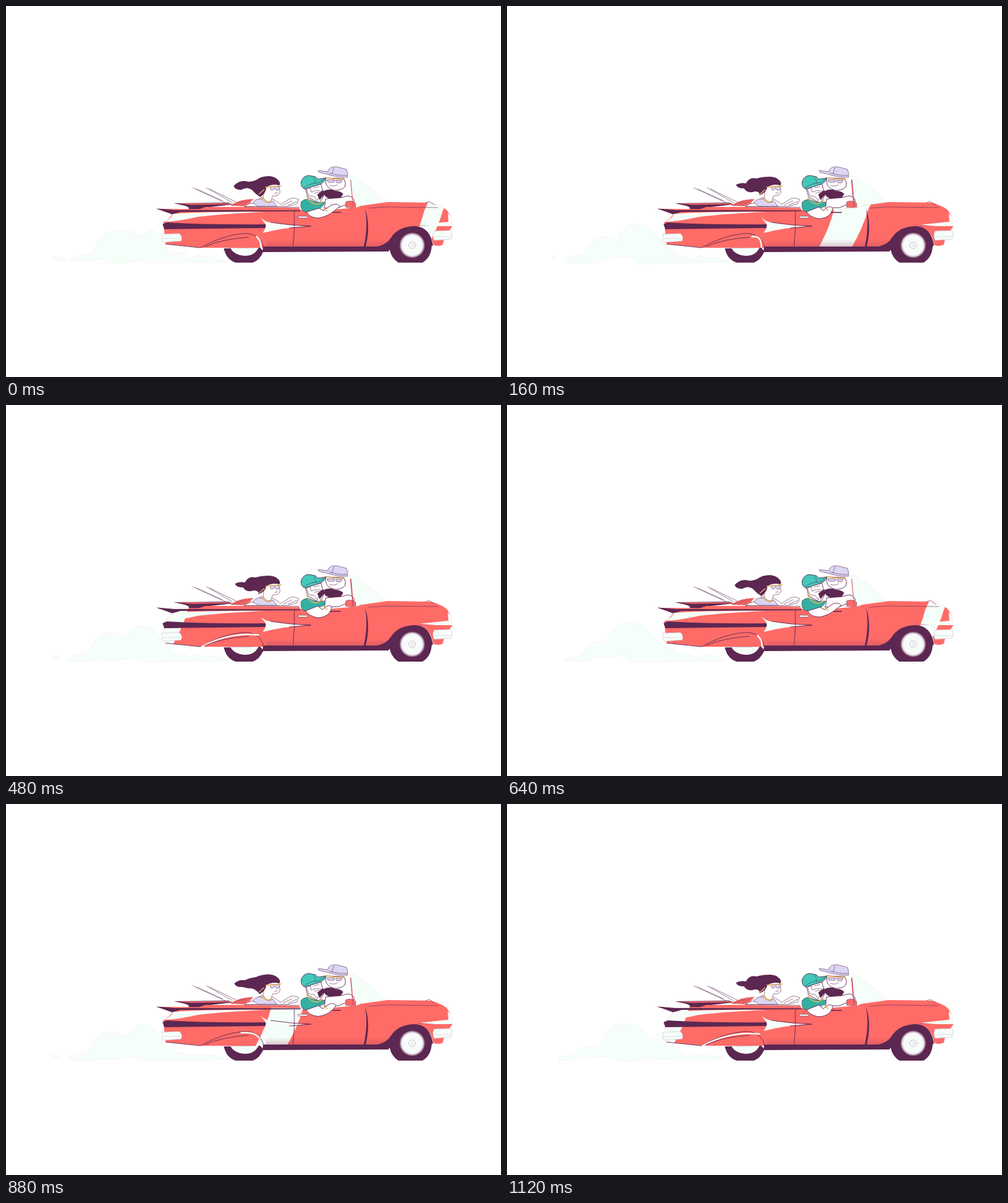
Write an HTML page that moves like this. It is 800 px wide and 600 px high and loops after 1.2 s.

```html
<!DOCTYPE html>
<html lang="en">
<head>
<meta charset="utf-8">
<title>Convertible</title>
<style>
html, body { margin: 0; width: 100%; height: 100%; overflow: hidden; background: #fff }
svg { display: block; width: 800px; height: 600px }
.red { fill: #ff6b67 }
.dark { fill: #5c2751 }
.mint { fill: #f6fef9 }
.teal { fill: #43c9b9 }
.shade { fill: #33b0a3 }
.lilac { fill: #dcd6f4 }
.skin { fill: #fffdfd }
.ink { stroke: #5c2751; stroke-width: .9; stroke-linejoin: round; stroke-linecap: round }
.thin { stroke-width: .6 }
.line { fill: none }
.gold { fill: none; stroke: #e5b254; stroke-width: 1.6; stroke-linecap: round }
</style>
</head>
<body>
<svg viewBox="0 0 800 600">
<defs>
  <path id="body" d="M243 328 L475 330 H520 L566 326 L574 323 L617 317 L686 318 Q711 325 715 334 Q722 345 721 357 L716 364 H691 L708 377 L706 386 Q698 390 690 386 Q688 360 660 357 Q634 357 627 380 L612 391 H350 L318 391 L258 385 L254 350 L262 345 L269 337 Z"/>
  <clipPath id="shell"><use href="#body"/></clipPath>
  <radialGradient id="hub">
    <stop offset=".74" stop-color="#f7fcfa"/>
    <stop offset=".84" stop-color="#e6d6e1"/>
    <stop offset="1" stop-color="#5c2751"/>
  </radialGradient>
  <linearGradient id="low" x2="0" y2="1">
    <stop offset=".5" stop-color="#8f3a5a" stop-opacity="0"/>
    <stop offset="1" stop-color="#8f3a5a" stop-opacity=".3"/>
  </linearGradient>
</defs>

<path id="smoke" class="mint" stroke="#f3ede9" stroke-width=".6"/>

<!-- rear deck -->
<path class="ink line thin" d="M302 294 L356 319 M308 296 L350 315 M324 294 L366 318 M329 296 L372 317"/>
<path class="dark" d="M271 319 L360 318 L366 321 L330 325 L318 329 H294 Q299 326 289 323 Z"/>
<path class="red" d="M276 319.5 L360 319 L364 320.500 L300 321.500 Z M322 325 L385 325 L474 326.500 L476 330 H308 Z M362 323 Q375 313 400 312 L390 324 Z"/>
<path class="ink line thin" d="M366 323 L382 315 M373 323 L388 314 M380 323 L395 313 M385 324.500 L474 325.500"/>

<!-- woman -->
<path class="skin ink thin" d="M386 324 Q392 318 403 319 L410 311 Q425 308 434 314 L444 321 L458 312 Q465 309 473 313 L470 320 L455 324 Z"/>
<path class="lilac ink thin" d="M399 318 Q406 309 415 313 Q424 322 431 315 L438 324 H408 Z"/>
<path class="skin ink thin" d="M418 288 H440 L443 301 Q441 308 431 307 L428 316 Q421 319 416 310 Z"/>
<path id="hair" class="dark"/>
<path class="lilac ink thin" d="M427 292 H442 Q442 299 437 298 L434 294 Q431 300 428 297 Z"/>
<path class="gold" d="M409 304 L417 297 M420 293 L445 291 M413 309 Q419 320 427 316"/>
<path class="ink line thin" d="M434 303 L439 302 M448 322 L462 315 M456 322 L470 316"/>

<!-- driver -->
<path class="skin ink" d="M517 278 L546 279 Q550 285 548 292 Q542 299 530 298 Q519 295 517 287 Z"/>
<path class="dark" d="M512 300 Q522 294 532 299 Q541 299 545 304 L541 310 L524 312 Q514 309 512 300 Z"/>
<path class="skin ink" d="M517 312 L541 310 L552 307 Q562 308 563 316 L554 319 L538 326 L515 327 Z"/>
<path class="lilac ink thin" d="M505 266 L520 268 Q522 259 534 260 L550 264 Q553 269 552 277 Q532 277 519 272 L506 269 Z"/>
<path class="ink line thin" d="M527 271 L530 262 M522 270 Q538 275 551 274"/>
<path class="lilac ink thin" d="M519 281 H531 L530 285 H521 Z M533 282 H543 L541 286 H535 Z"/>
<path class="gold" d="M517 278 L547 281"/>
<path class="ink line thin" d="M523 290 Q530 293 536 289"/>

<!-- windscreen and wheel -->
<path class="mint" stroke="#ece9eb" stroke-width=".6" d="M556 275 L564 277 Q592 294 619 322 L590 326 H566 Z"/>
<path class="red ink thin" d="M549 325 V317 Q557 313 565 319 V327 Z"/>
<path id="pillar" class="line" stroke="#c74b5b" d="M557 281 L561 325"/>

<!-- coachwork -->
<use href="#body" class="red"/>
<path id="shine" class="mint" clip-path="url(#shell)"/>
<path class="dark" d="M243 327.500 L272 330 L476 330.500 V332 L282 333 L269 337 Z"/>
<path class="dark" d="M487 333 H541 V334.500 H487 Z"/>
<path class="mint" d="M270 336 Q340 332 420 333 Q350 336 310 341 Q280 348 256 349 Q267 344 270 336 Z"/>
<path class="dark" d="M253 353 L260 350 Q330 354 421 353 V359 Q330 360 256 361 Z"/>
<path fill="url(#low)" d="M420 365 H612 L622 390 H420 Z"/>
<path class="mint" d="M411 342 Q418 349 428 350 Q455 355 490 356 Q450 358 415 367 Q422 357 419 352 Z"/>
<path class="ink line" d="M428 350 Q460 355 493 356 L458 359"/>
<path class="ink line" stroke-width="1.5" d="M466 332 Q467 360 464 388"/>
<path class="dark" d="M580 327 Q590 355 581 390 H578 Q586 355 580 327 Z"/>
<path class="mint ink thin" d="M472 340 H486 Q490 342 486 343 H473 Z"/>
<path class="ink line thin" d="M586 327 L614 325 L698 326 M668 355 L715 354"/>
<path class="mint" d="M668 354 Q695 351 715 349 L714 335 Q722 342 721 356 L695 356 Z"/>
<path class="ink line thin" d="M678 318 L684 316 L693 322"/>
<path class="dark" d="M416 389 H600 Q615 386 622 375 Q634 356 662 356 Q686 358 690 388 L622 391 L618 397 L414 398 Z"/>
<path class="ink line" stroke-width="2" d="M258 385 L314 391 Q350 371 382 368 Q408 366 416 388 V396"/>
<path id="fender" class="line" stroke="#f6fef9" stroke-width="2.400" stroke-linecap="round"/>
<path class="ink line" d="M322 389 Q348 377 392 374"/>
<path class="mint" stroke="#cdc6d1" stroke-width=".7" d="M251 369 L280 368 Q286 373 283 380 L256 382 Q249 380 253 376 Z M692 364 L719 363 Q723 370 719 377 L692 379 Q688 371 692 364 Z"/>
<path class="line" stroke="#d9d2dc" stroke-width=".8" d="M253 376 H282 M692 373 H720"/>

<!-- wheels -->
<path class="dark" d="M352 392 L411 391 L416 397 Q410 411 399 415 H371 Q356 410 352 392 Z"/>
<path class="mint" d="M363 392 L408 391 Q402 404 386 404 Q369 403 363 392 Z"/>
<path class="dark" d="M620 394 Q621 360 656 357 Q688 360 688 388 Q687 407 673 415 H634 Q623 408 620 394 Z"/>
<circle cx="656.500" cy="387" r="21" fill="url(#hub)"/>
<circle cx="656.500" cy="387" r="5.500" fill="#f8faf8" stroke="#c9c3cc"/>
<path class="line" stroke="#d5ced8" d="M655 384 L659 387 L655 390"/>

<!-- front passenger -->
<path class="skin ink" d="M484 294 L509 288 L511 296 L515 302 Q512 312 506 319 L488 309 Z"/>
<path id="shirt" class="shade ink thin"/>
<path id="arm" class="skin ink"/>
<path class="skin ink thin" d="M486 296 L492 294 L493 301 Q500 297 509 299 L511 304 L506 307 L503 315 L498 308 L490 307 Z"/>
<path class="dark" d="M503 305 L512 298 L516 304 Q511 308 507 314 Z"/>
<path class="ink line thin" d="M497 294 L506 292 M498 303 Q504 300 509 302"/>
<path class="teal ink" d="M477 285 Q479 275 489 274 L500 276 L504 280 L517 278 Q515 286 505 289 L483 296 Q476 293 477 285 Z"/>
<path class="ink line thin" d="M482 294 Q492 286 505 286 L515 280 M497 277 Q501 281 500 287"/>
<path id="chain" class="gold"/>
</svg>
<script>
const STEP = 80, FRAMES = 15;
const $ = id => document.getElementById(id);
const draw = (id, d) => $(id).setAttribute('d', d);

const smoke = [
  'M103 413Q112 402 133 401Q142 399 147 386Q150 364 180 363Q205 361 215 371Q225 369 234 362Q245 364 252 382Q266 400 272 401Q283 393 292 404Q297 411 302 408Q312 401 320 407Q330 402 338 408L358 414L235 415Q220 413 210 412Q180 421 160 412Q150 406 140 412ZM73 408Q80 403 83 408Q95 402 98 411Q90 416 88 411Q76 414 73 408Z',
  'M100 414Q104 404 125 402Q136 400 140 388Q147 368 170 369Q188 369 196 377Q203 358 220 357Q238 357 246 375Q262 394 276 403Q286 400 296 408Q312 401 321 407Q334 403 358 413L224 416Q208 407 195 410Q172 415 155 411Q148 414 132 415ZM73 407Q78 403 81 407Q86 405 88 409Q80 412 73 407Z',
  'M95 414Q100 404 118 403Q128 398 131 389Q140 371 158 374Q172 374 180 379Q186 354 207 353Q230 353 241 371Q250 382 256 385Q275 398 280 405Q290 410 300 409Q312 400 322 407Q340 405 358 414L212 417Q200 402 185 406Q165 409 150 411Q145 417 125 416ZM73 405Q76 402 79 405Q77 410 73 405Z',
  'M92 413Q96 405 112 408Q122 407 126 397Q134 381 152 383Q162 384 164 376Q175 353 197 352Q222 353 232 369Q248 390 262 393Q272 394 280 402Q300 404 310 410Q325 402 340 406L354 414L200 416Q190 400 183 404Q172 411 160 409Q140 405 130 415Z',
  'M82 413Q84 405 97 408Q110 408 116 397Q130 390 145 391Q154 390 157 376Q165 356 187 355Q212 356 221 367Q230 383 235 380Q242 368 250 376Q256 390 272 394Q283 400 290 410Q305 403 315 408Q330 405 350 411L330 414L240 413Q225 408 215 414Q190 420 175 412Q165 408 150 409Q130 411 112 412Q95 418 82 413Z'
];

// left and right edge of the reflection at the belt line, for each step
const shine = [[676, 706], [608, 653], [528, 583], [428, 480], [321, 368], [280, 324], [250, 294], [205, 238]];

// blends the numbers of two paths of the same form
function blend(a, b, k) {
  const ends = b.match(/[\d.]+/g);
  let i = 0;
  return a.replace(/[\d.]+/g, n => +n + (ends[i++] - n) * k);
}

const poses = {
  hair: [
    'M368 291Q376 282 386 283Q396 286 405 281Q412 275 426 275Q440 277 443 287L442 290Q430 287 421 293Q420 303 411 309Q403 304 397 297Q389 292 381 297Q370 298 368 291Z',
    'M370 289Q378 285 386 287Q392 276 403 279Q412 276 426 276Q440 277 443 287L442 290Q430 287 421 293Q418 303 408 306Q409 299 400 300Q389 304 383 295Q372 295 370 289Z'],
  shirt: [
    'M477 317Q482 311 491 313Q500 319 515 317L513 322L506 329L486 333Q474 332 477 317Z',
    'M477 318Q481 312 490 313Q500 319 515 317L516 323L504 328L484 333Q475 332 477 318Z'],
  arm: [
    'M486 333L506 327L513 331L526 322Q536 318 540 324L532 330Q521 340 505 343Q489 342 486 333Z',
    'M484 333L504 325L511 331L519 325Q527 323 526 330L522 337Q515 344 503 344Q489 341 484 333Z'],
  chain: [
    'M486 307Q491 320 503 321L511 317M513 326L519 332',
    'M486 309Q492 321 503 320L512 315M513 325L519 331']
};

const fender = [
  'M405 373Q413 380 412 390', 'M404 374Q412 379 411 390', 'M396 373Q412 371 411 390',
  'M380 370Q402 368 409 378', 'M346 381Q380 366 409 375', 'M335 386Q375 366 411 377',
  'M316 391Q360 367 408 372', 'M405 373Q413 380 412 390'
];

function tick() {
  const n = Math.floor(performance.now() / STEP) % FRAMES;
  const sweep = n % 8, sway = [0, .5, 1, .5][n % 4];
  const [l, r] = shine[sweep];
  draw('smoke', smoke[n % 5]);
  draw('shine', `M${l + 8} 314L${l} 331Q${l - 7} 360 ${l - 26} 394H${r - 28}Q${r - 8} 360 ${r} 331L${r + 8} 314Z`);
  draw('fender', fender[sweep]);
  for (const id in poses) draw(id, blend(...poses[id], sway));
  $('pillar').setAttribute('stroke-width', 1 + sway * .8);
  requestAnimationFrame(tick);
}
tick();
</script>
</body>
</html>
```
